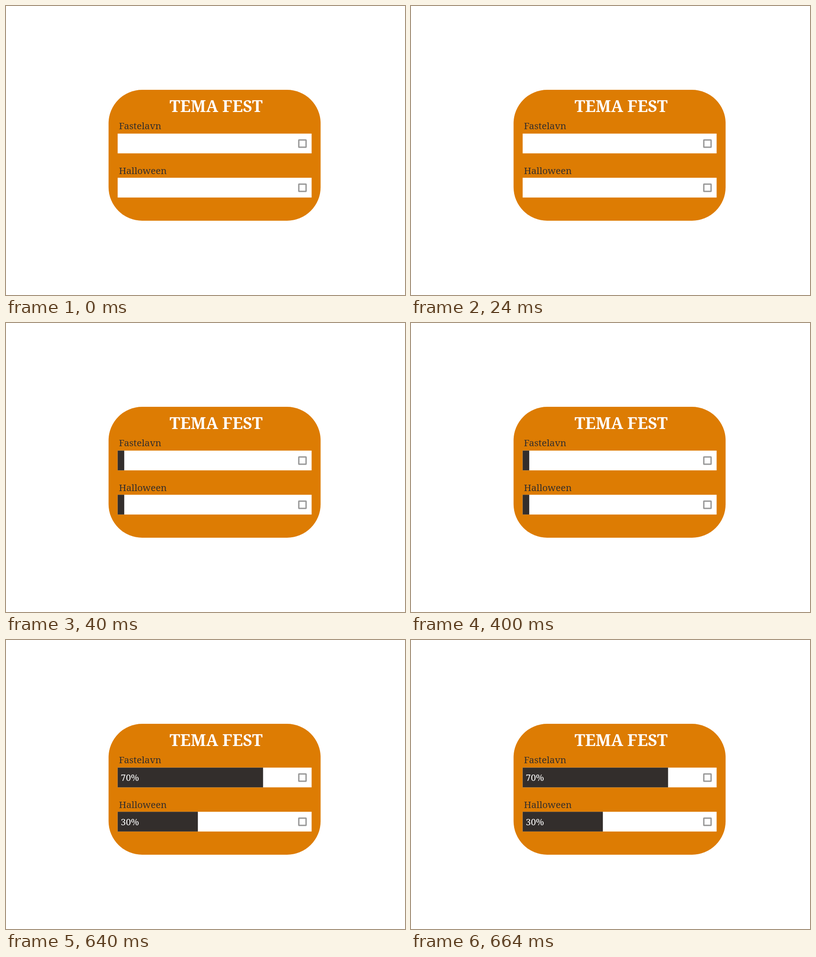
Recreate the animation shown at these times as an HTML page. Size 878 px wide and 638 px high, loop 680 ms.

```html
<!DOCTYPE html>
<html lang="da">
<head>
<meta charset="utf-8">
<title>Tema fest</title>
<style>
  html, body { margin: 0; width: 100%; height: 100%; overflow: hidden; background: #fff; }
  svg { display: block; width: 878px; height: 638px; }
  text { font: 20.5px "Roboto Slab", "Noto Serif", serif; fill: #332e2c; }
  .title { font-size: 35.5px; font-weight: 700; fill: #fff; text-anchor: middle; }
  .percent { font-size: 20px; fill: #fff; }
  .track { fill: #fff; }
  .fill { fill: #332e2c; }
  .box { fill: #fff; stroke: #999; stroke-width: 3; }
</style>
</head>
<body>
<svg viewBox="0 0 878 638">
  <rect x="225.7" y="185" width="466.6" height="289" rx="74" fill="#dd7c03"/>
  <text class="title" x="462.3" y="234">TEMA FEST</text>
  <g id="rows"></g>
</svg>
<script>
const LOOP = 680, START = 40, FULL = 640;
const rows = [
  { label: "Fastelavn", base: 272, top: 281.7, width: 320, share: 70 },
  { label: "Halloween", base: 371, top: 379.2, width: 176.5, share: 30 }
];

const group = document.getElementById("rows");
group.innerHTML = rows.map(({ label, base, top, share }) => `
  <text x="248.5" y="${base}">${label}</text>
  <rect class="track" x="245.7" y="${top}" width="426.8" height="43.6"/>
  <rect class="fill" x="245.7" y="${top}" width="0" height="43.6"/>
  <text class="percent" x="252.5" y="${top + 29.5}">${share}%</text>
  <rect class="box" x="644.3" y="${top + 14}" width="16" height="16" rx="0.5"/>`).join("");

const fills = group.querySelectorAll(".fill");
const percents = group.querySelectorAll(".percent");

function draw(now) {
  const t = now % LOOP;
  const full = t >= FULL;
  rows.forEach((row, i) => {
    fills[i].setAttribute("width", full ? row.width : t >= START ? 14.5 : 0);
    percents[i].setAttribute("visibility", full ? "visible" : "hidden");
  });
}

const begin = performance.now();
function tick() {
  draw(performance.now() - begin);
  requestAnimationFrame(tick);
}
tick();
</script>
</body>
</html>
```
